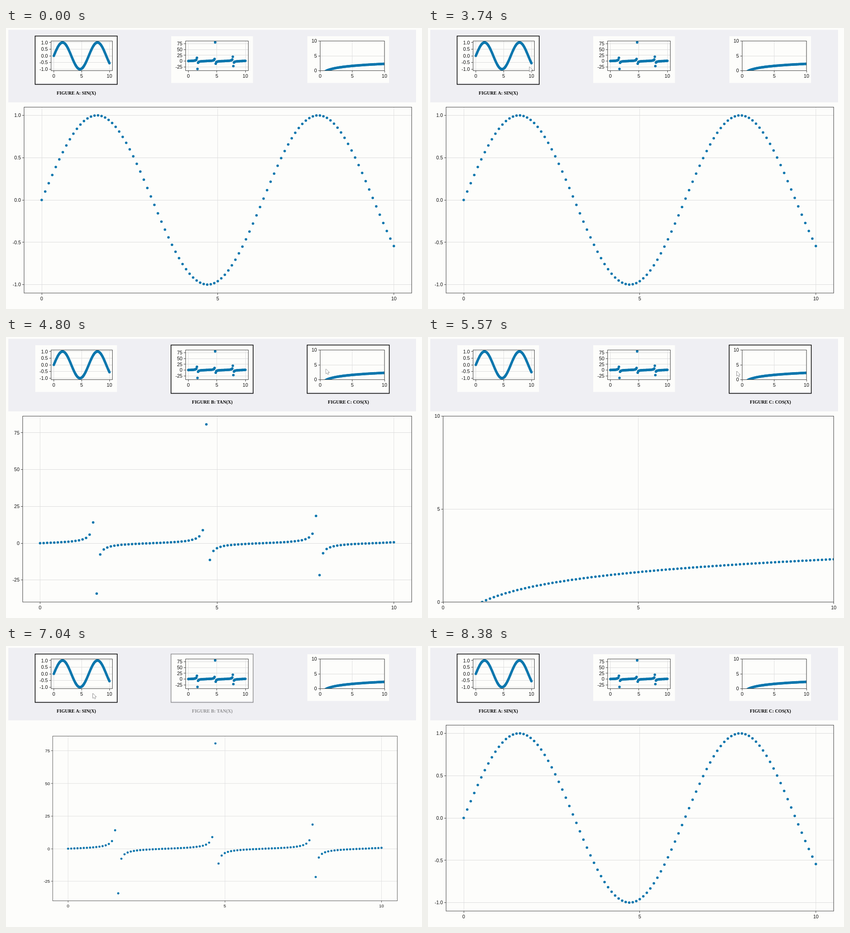
These frames come from a looping animation (909x616 px, 8.42 s). An HTML page with a canvas:

```html
<!DOCTYPE html>
<html>
<head>
<meta charset="utf-8">
<style>
html, body { margin: 0; width: 100%; height: 100%; overflow: hidden; background: #fdfdfb; }
canvas { display: block; }
</style>
</head>
<body>
<canvas id="stage" width="909" height="616"></canvas>
<script>
const ctx = document.getElementById('stage').getContext('2d');
const PAGE = '#fdfdfb', BAND = '#efeff3', BLUE = '#0b76ad';
const LOOP = 8420, DELAY = 80, FADE = 170, RESET = 8200;

// thumb and big: left, right, top, bottom, x of 0, x of 10, y of 0, pixels per y unit
const figures = [
  { name: 'FIGURE A: SIN(X)', f: Math.sin, ticks: [-1, -.5, 0, .5, 1], digits: 1, card: 64,
    thumb: [98.5, 232.5, 28.5, 93.5, 104.5, 226, 61, 29.3],
    big: [39.5, 886.5, 173.5, 581, 78, 847.5, 377, 185.5] },
  { name: 'FIGURE B: TAN(X)', f: Math.tan, ticks: [-25, 0, 25, 50, 75], digits: 0, card: 361,
    thumb: [392.5, 529.5, 28.5, 93.5, 398.5, 523, 72.4, .508],
    big: [36.5, 886.5, 173.5, 581, 74.5, 847.5, 452, 3.227] },
  { name: 'FIGURE C: COS(X)', f: Math.log, ticks: [0, 5, 10], digits: 0, card: 658.5,
    thumb: [686.5, 827, 28.5, 93.5, 686.5, 827, 93.5, 6.5],
    big: [33, 886.5, 173.5, 581, 33, 886.5, 581, 40.75] }
];

// time and index of the figure the pointer enters
const hovers = [[0, 0], [4050, 1], [4730, 2], [5900, 1], [6860, 0], [7380, 1], [7820, 2]];

// time, x, y
const path = [
  [1500, 912, 70], [1780, 866.5, 64], [2640, 866.5, 64], [2850, 800, 182],
  [3350, 330, 182], [3740, 221, 85], [4050, 361, 80], [4800, 699, 70],
  [5150, 760, 72], [5570, 675, 75], [5900, 540, 85], [6860, 243, 100],
  [7040, 190, 104], [7180, 172, 98], [7380, 361, 84], [7820, 658, 68], [8150, 745, -16]
];

const clamp = v => Math.min(1, Math.max(0, v));

function line(x1, y1, x2, y2, color) {
  ctx.strokeStyle = color;
  ctx.beginPath();
  ctx.moveTo(x1, y1);
  ctx.lineTo(x2, y2);
  ctx.stroke();
}

function drawPlot(fig, box, radius, fontSize, gap, tick) {
  const [left, right, top, bottom, x0, x10, y0, unit] = box;
  const px = x => x0 + (x10 - x0) * x / 10;
  const py = y => y0 - y * unit;
  const snap = v => Math.floor(v) + .5;
  ctx.lineWidth = 1;
  for (const x of [0, 5, 10]) line(snap(px(x)), top, snap(px(x)), bottom, '#e1e1e1');
  for (const y of fig.ticks) line(left, snap(py(y)), right, snap(py(y)), '#dcdcdc');

  ctx.save();
  ctx.beginPath();
  ctx.rect(left, top, right - left, bottom - top);
  ctx.clip();
  ctx.fillStyle = BLUE;
  for (let i = 0; i <= 100; i++) {
    const y = fig.f(i / 10);
    if (!isFinite(y)) continue;
    ctx.beginPath();
    ctx.arc(px(i / 10), py(y), radius, 0, 7);
    ctx.fill();
  }
  ctx.restore();

  ctx.strokeStyle = '#444';
  ctx.strokeRect(left, top, right - left, bottom - top);
  ctx.font = fontSize + 'px "Liberation Sans", Arial, sans-serif';
  ctx.textBaseline = 'alphabetic';
  ctx.textAlign = 'center';
  ctx.fillStyle = '#111';
  for (const x of [0, 5, 10]) {
    line(snap(px(x)), bottom, snap(px(x)), bottom + tick, '#444');
    ctx.fillText(x, px(x), bottom + 12 + fontSize * .36);
  }
  ctx.textAlign = 'right';
  for (const y of fig.ticks) {
    line(left - tick, snap(py(y)), left, snap(py(y)), '#444');
    ctx.fillText(y.toFixed(fig.digits), left - gap, py(y) + fontSize * .36);
  }
}

function drawCard(fig, border, caption) {
  ctx.fillStyle = PAGE;
  ctx.fillRect(fig.card, 18, 178.5, 102.5);
  drawPlot(fig, fig.thumb, 2.8, 10.6, 7, 4);
  ctx.globalAlpha = border;
  ctx.strokeStyle = '#000';
  ctx.lineWidth = 1.5;
  ctx.strokeRect(fig.card - .4, 17.6, 179.4, 106);
  ctx.globalAlpha = caption;
  ctx.fillStyle = '#000';
  ctx.font = 'bold 10.1px "Liberation Serif", "Times New Roman", serif';
  ctx.textAlign = 'center';
  ctx.fillText(fig.name, fig.card + 89.7, 146.3);
  ctx.globalAlpha = 1;
}

function drawCursor(t) {
  const i = path.findIndex(p => p[0] > t);
  if (i < 1) return;
  const [t0, x0, y0] = path[i - 1], [t1, x1, y1] = path[i];
  const k = (t - t0) / (t1 - t0);
  ctx.save();
  ctx.translate(x0 + (x1 - x0) * k, y0 + (y1 - y0) * k);
  ctx.fillStyle = '#fff';
  ctx.strokeStyle = '#333';
  ctx.lineWidth = 1;
  ctx.stroke(arrow);
  ctx.fill(arrow);
  ctx.restore();
}
const arrow = new Path2D('M0 0V10.4L2.4 8.2L4 12L5.8 11.2L4.2 7.6H7.3Z');

function draw(t) {
  ctx.fillStyle = PAGE;
  ctx.fillRect(0, 0, 909, 616);
  ctx.fillStyle = BAND;
  ctx.fillRect(5, 4, 891, 159);

  const done = t >= RESET;
  const n = hovers.filter(h => h[0] <= t).length - 1;
  const current = done ? 0 : hovers[n][1];
  const previous = n && !done ? hovers[n - 1][1] : -1;
  const p = n && !done ? (t - hovers[n][0] - DELAY) / FADE : 2;

  figures.forEach((fig, i) => {
    const border = i === current ? 1 : i === previous ? 1 - clamp(p) : 0;
    drawCard(fig, border, done && i === 2 ? 1 : border);
  });

  // the old plot shrinks, then the new one grows
  const scale = 1 - .192 * (p < 1 ? clamp(p) : clamp(2 - p));
  const shown = figures[p < 1 ? previous : current];
  ctx.save();
  ctx.translate(611, 385);
  ctx.scale(scale, scale);
  ctx.translate(-611, -385);
  drawPlot(shown, shown.big, 2.75, 10.5, 7, 4);
  ctx.restore();

  drawCursor(t);
}

const start = performance.now();
function frame() {
  draw((performance.now() - start) % LOOP);
  requestAnimationFrame(frame);
}
frame();
</script>
</body>
</html>
```
